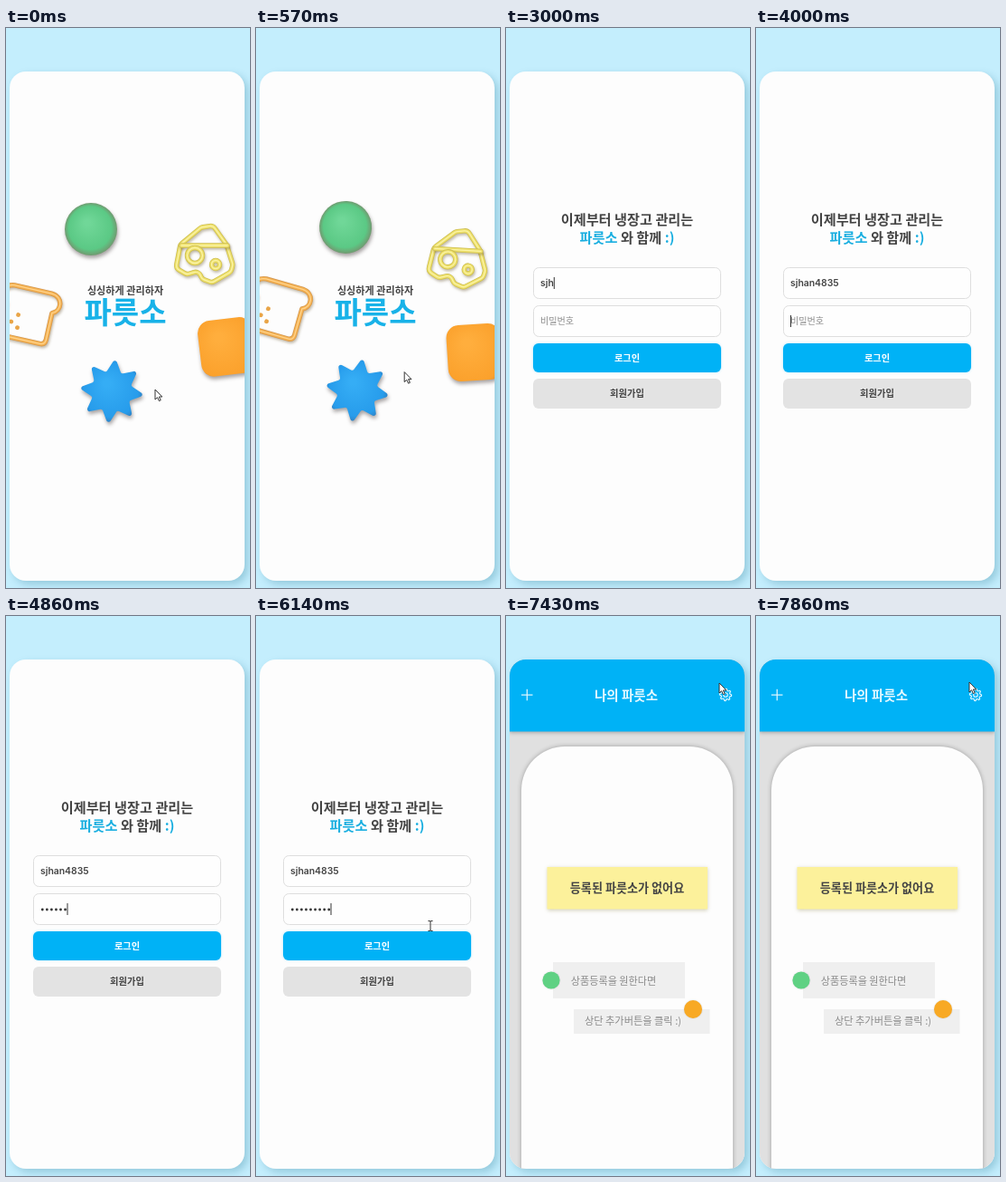
Recreate the animation shown at these times as an HTML page with a canvas. Size 270 by 618 pixels, loop 8000 ms.

```html
<!DOCTYPE html>
<html lang="ko">
<head>
<meta charset="utf-8">
<style>
html, body { margin: 0; width: 100%; height: 100%; overflow: hidden; background: #c4eefd; }
canvas { display: block; width: 270px; height: 618px; }
</style>
</head>
<body>
<canvas id="stage"></canvas>
<script>
const W = 270, H = 618, LOOP = 8000, FPS = 7;
const BRAND = '파릇소', USER = 'sjhan4835';
const KR = '"Noto Sans CJK KR", "Noto Sans CJK", "Noto Sans", sans-serif';
const LATIN = 'Inter, "Noto Sans", sans-serif';
const BLUE = '#00b2f6', INK = '#444';
const canvas = document.getElementById('stage');
const c = canvas.getContext('2d');
const dpr = window.devicePixelRatio || 1;
canvas.width = W * dpr;
canvas.height = H * dpr;

const clamp = (v, a, b) => Math.max(a, Math.min(b, v));

function shadow(color = 'transparent', blur = 0, x = 0, y = 0) {
  c.shadowColor = color;
  c.shadowBlur = blur * dpr;
  c.shadowOffsetX = x * dpr;
  c.shadowOffsetY = y * dpr;
}

function box(x, y, w, h, r, fill, line) {
  c.beginPath();
  c.roundRect(x, y, w, h, r);
  if (fill) { c.fillStyle = fill; c.fill(); }
  if (line) { shadow(); c.strokeStyle = line; c.lineWidth = 1; c.stroke(); }
}

function disc(x, y, r, fill) {
  c.beginPath();
  c.arc(x, y, r, 0, 7);
  c.fillStyle = fill;
  c.fill();
}

// y is the vertical centre of the glyphs
function text(str, x, y, size, color, weight = 400, align = 'center', family = KR) {
  c.font = `${weight} ${size}px ${family}`;
  c.textAlign = align;
  c.fillStyle = color;
  c.fillText(str, x, y + size * 0.37);
  return c.measureText(str).width;
}

function glow(x, y, r, inner, mid, outer) {
  const g = c.createRadialGradient(x - r * .15, y - r * .25, r * .1, x, y, r);
  g.addColorStop(0, inner);
  g.addColorStop(.8, mid);
  g.addColorStop(1, outer);
  return g;
}

function poly(points, r) {
  const n = points.length, [a, b] = [points[n - 1], points[0]];
  c.beginPath();
  c.moveTo((a[0] + b[0]) / 2, (a[1] + b[1]) / 2);
  points.forEach((p, i) => c.arcTo(...p, ...points[(i + 1) % n], r));
  c.closePath();
}

function tube(dark, mid, light) {
  c.lineJoin = c.lineCap = 'round';
  shadow('rgba(90,70,30,.35)', 3, 1, 2);
  [[5.4, dark], [3.8, mid], [1.3, light]].forEach(([w, color]) => {
    c.lineWidth = w;
    c.strokeStyle = color;
    c.stroke();
    shadow();
  });
}

const clay = () => shadow('rgba(60,50,50,.45)', 4, 1, 3);

function ball() {
  clay();
  disc(0, 0, 29, glow(0, 0, 29, '#70d798', '#5bc985', '#719a70'));
}

function star() {
  const pts = [];
  for (let i = 0; i < 16; i++) {
    const a = i * Math.PI / 8 - 1.46, r = i % 2 ? 22 : 37;
    pts.push([r * Math.cos(a), r * Math.sin(a)]);
  }
  clay();
  poly(pts, 2.5);
  c.fillStyle = glow(0, 0, 37, '#35adf5', '#279ceb', '#3478b5');
  c.fill();
}

function cube() {
  c.rotate(-.12);
  clay();
  box(-29, -31, 60, 62, 14, glow(0, 0, 44, '#ffae3d', '#fba12c', '#c9873c'));
}

function bread() {
  c.rotate(.22);
  c.beginPath();
  c.moveTo(-22, -28);
  c.lineTo(20, -28);
  c.bezierCurveTo(34, -27, 35, -11, 25, -7);
  c.lineTo(25, 23);
  c.quadraticCurveTo(25, 29, 19, 29);
  c.lineTo(-22, 29);
  c.quadraticCurveTo(-28, 29, -28, 23);
  c.lineTo(-28, -7);
  c.bezierCurveTo(-37, -12, -35, -27, -22, -28);
  c.closePath();
  tube('#d8994f', '#f4b250', '#ffd18a');
  [[-11, 3], [-17, 12], [-9, 17]].forEach(([x, y]) => disc(x, y, 2.4, '#e9a548'));
}

function cheese() {
  poly([[-27, -8], [-4, -27], [9, -29], [24, -8], [31, 14], [29, 22], [8, 34],
    [-3, 30], [-7, 21], [-20, 25], [-32, 18]], 6);
  tube('#cfc052', '#eee06b', '#faf3a4');
  c.beginPath();
  c.moveTo(-26, -7);
  c.lineTo(25, -7);
  tube('#cfc052', '#eee06b', '#faf3a4');
  [[-11, 4, 8.5], [12, 14, 4.5]].forEach(([x, y, r]) => {
    c.beginPath();
    c.arc(x, y, r, 0, 7);
    tube('#cfc052', '#eee06b', '#faf3a4');
  });
}

const TOYS = [[ball, 94, 222], [cheese, 220, 247], [cube, 243, 352], [star, 117, 401], [bread, 25, 316]];

function splash(k) {
  const turn = k * .014, cos = Math.cos(turn), sin = Math.sin(turn);
  TOYS.forEach(([draw, x, y]) => {
    const dx = x - 134, dy = y - 312;
    c.save();
    c.translate(134 + dx * cos - dy * sin, 312 + dx * sin + dy * cos);
    c.rotate(turn);
    draw();
    c.restore();
  });
  text('싱싱하게 관리하자', 132, 290, 11.1, INK, 700);
  text(BRAND, 132, 314, 33, '#18b2e8', 700);
}

function caret(x, y) {
  c.fillStyle = '#333';
  c.fillRect(x, y - 6, 1, 13);
}

function login(k) {
  text('이제부터 냉장고 관리는', 134, 211, 15.2, INK, 700);

  const parts = [[BRAND, '#18aee0'], [' 와 함께 ', INK], [':)', '#18aee0']];
  c.font = `700 15.2px ${KR}`;
  let x = 134 - c.measureText(parts.map(p => p[0]).join('')).width / 2;
  parts.forEach(([s, color]) => { x += text(s, x, 231, 15.2, color, 700, 'left'); });

  box(30.5, 264.5, 207, 34, 6, '#fefefe', '#dedede');
  box(30.5, 306.5, 207, 34, 6, '#fefefe', '#dedede');
  shadow('rgba(0,177,246,.3)', 3);
  box(30, 348, 208, 32, 6, BLUE);
  shadow();
  box(30, 387, 208, 33, 6, '#e3e3e3');
  text('로그인', 134, 364, 10.2, '#fff', 700);
  text('회원가입', 134, 403.5, 10.3, INK, 700);

  const typed = USER.slice(0, clamp(k - 18, 0, 9));
  let end = 38;
  if (typed) end += text(typed, 38, 281.5, 10.4, INK, 600, 'left', LATIN);
  else text('아이디', 38, 281.5, 10.1, '#8c8c8c', 400, 'left');
  if (k >= 12 && k < 28) caret(end, 281);

  const dots = clamp(Math.round((k - 29) * 9 / 8), 0, 9);
  if (!dots) text('비밀번호', 38, 323.5, 10.1, '#8c8c8c', 400, 'left');
  for (let i = 0; i < dots; i++) disc(40.3 + i * 5.05, 324, 1.4, '#333');
  if (k >= 28 && k < 45 && (k < 40 || k > 42)) caret(dots ? 37.5 + dots * 5 : 38, 323);
}

function dialog() {
  shadow('rgba(40,70,90,.4)', 4, 0, 1);
  box(-8, -8, W + 16, 73, 0, '#f5fbfe');
  shadow();
  text('로그인 성공!', -2, 8, 9.3, '#333', 400, 'left');
  box(225, 23, 46, 31, 15.5, '#17769f');
  box(226.5, 24.5, 43, 28, 14, '#eefaff');
  box(228, 26, 40, 25, 12.5, '#285d73');
  text('확인', 248.5, 38.5, 9.2, '#d9f1fa', 500);
}

function gear(x, y) {
  c.beginPath();
  for (let i = 0; i < 32; i++) {
    const a = i * Math.PI / 16, r = i % 4 < 2 ? 6.6 : 4.9;
    c.lineTo(x + r * Math.cos(a), y + r * Math.sin(a));
  }
  c.closePath();
  c.moveTo(x + 2.3, y);
  c.arc(x, y, 2.3, 0, 7);
  c.strokeStyle = '#e4f8ff';
  c.lineWidth = 1.1;
  c.stroke();
}

function home() {
  c.fillStyle = '#e0e0e0';
  c.fillRect(4, 48, 260, 562);
  shadow('rgba(0,0,0,.25)', 4, 0, 1);
  box(4, 48, 260, 79.5, 0, BLUE);
  shadow('rgba(0,0,0,.3)', 5);
  box(17, 144, 234, 490, [48, 48, 0, 0], '#fdfdfd');
  shadow();

  c.fillStyle = '#e4f8ff';
  c.fillRect(17, 86.5, 12.5, 1.2);
  c.fillRect(22.7, 80.8, 1.2, 12.5);
  text('나의 ' + BRAND, 133, 88, 14.5, '#e4f8ff', 700);
  gear(243, 87);

  shadow('rgba(120,110,40,.3)', 4, 0, 1);
  box(45.5, 277, 177.5, 46.5, 0, '#fcf19b');
  shadow();
  text(`등록된 ${BRAND}가 없어요`, 134, 300.5, 13.1, INK, 700);

  box(52, 382, 146, 40, 0, '#efefef');
  text('상품등록을 원한다면', 119, 402.5, 11.1, '#8a8a8a', 500);
  box(75, 434, 150.5, 27, 0, '#efefef');
  text('상단 추가버튼을 클릭 :)', 140.5, 447, 11.2, '#8a8a8a', 500);
  shadow('rgba(0,0,0,.15)', 2);
  disc(50, 402, 9.6, '#5fd183');
  disc(207, 434, 10, '#f8a924');
  shadow();
}

const PATH = [[0, 165, 399], [3, 165, 399], [8, 161, 302], [12, 152, 284], [17, 152, 284],
  [43, 193, 342], [45, 190, 362], [46, 192, 340], [48, 205, 106], [50, 247, 40], [52, 236, 74], [55, 236, 73]];

function pointerAt(k) {
  let i = 0;
  while (i < PATH.length - 2 && PATH[i + 1][0] <= k) i++;
  const [a, b] = [PATH[i], PATH[i + 1]];
  const f = clamp((k - a[0]) / (b[0] - a[0]), 0, 1);
  return [a[1] + (b[1] - a[1]) * f, a[2] + (b[2] - a[2]) * f];
}

const ARROW = 'M0 0V11L2.6 8.7L4.4 12.6L6.2 11.8L4.4 8H7.8Z';
const HAND = 'M0 1C0-.5 2-.5 2 1V6C2 4.6 4 4.6 4 6C4 5 6 5 6 6.5C6 5.6 8 5.6 8 7.2'
  + 'V11C8 13 7 14 6.5 16H0C-.5 13.5-3 11.5-4 9C-4 7.6-2.4 7.6-1.6 8.6L0 10Z';
const BEAM = 'M-2.5-5.5H-1Q0-5.5 0-4.5Q0-5.5 1-5.5H2.5M0-4.5V4.5M-2.5 5.5H-1Q0 5.5 0 4.5Q0 5.5 1 5.5H2.5';
const [arrow, hand, beam] = [ARROW, HAND, BEAM].map(d => new Path2D(d));

function pointer(k) {
  if (k >= 18 && k < 43) return;
  const shape = k < 9 || k > 50 ? arrow : k < 18 || k < 45 ? beam : hand;
  c.save();
  c.translate(...pointerAt(k));
  c.lineJoin = 'round';
  c.lineWidth = 1;
  c.strokeStyle = '#333';
  if (shape !== beam) {
    c.fillStyle = '#fff';
    c.fill(shape);
  }
  c.stroke(shape);
  c.restore();
}

function draw(k) {
  c.setTransform(dpr, 0, 0, dpr, 0, 0);
  shadow();
  c.fillStyle = '#c4eefd';
  c.fillRect(0, 0, W, H);
  shadow('rgba(30,110,140,.28)', 8, 4, 4);
  box(4, 48, 260, 562, 18, '#fdfdfd');
  shadow();
  c.save();
  c.beginPath();
  c.roundRect(4, 48, 260, 562, 18);
  c.clip();
  if (k < 8) splash(k);
  else if (k < 51) login(k);
  else home();
  c.restore();
  if (k >= 46 && k < 51) dialog();
  pointer(k);
}

const start = performance.now();
function tick() {
  const t = (performance.now() - start) % LOOP;
  draw(Math.floor((t + 5) * FPS / 1000) % (LOOP * FPS / 1000));
  requestAnimationFrame(tick);
}
tick();
</script>
</body>
</html>
```
